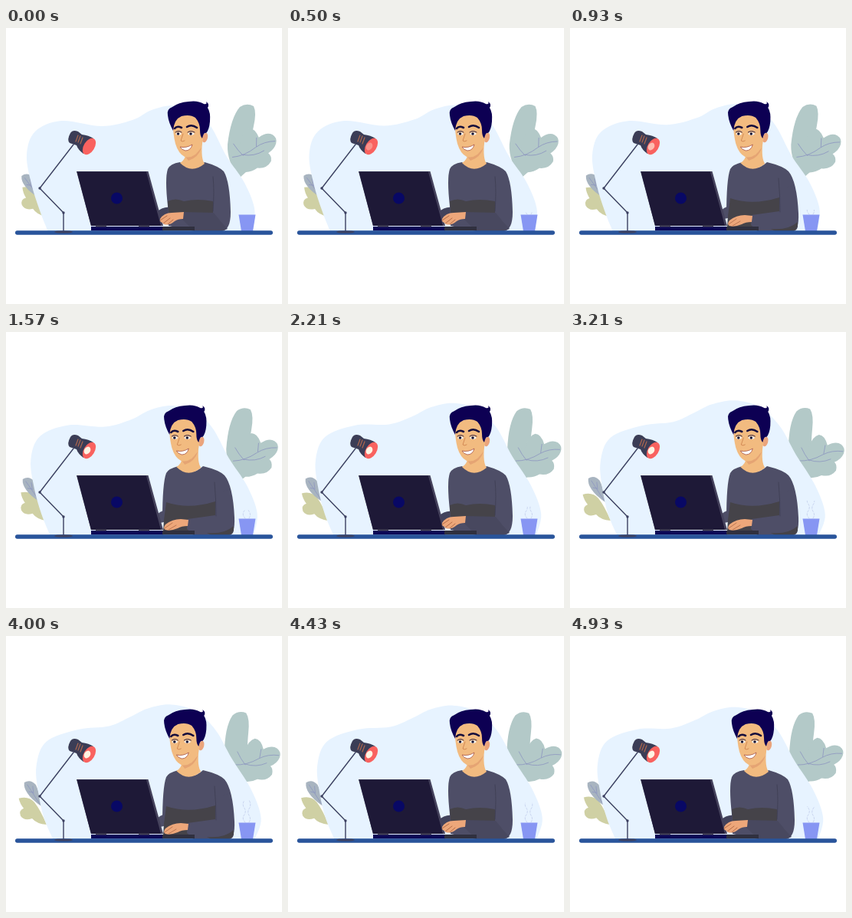
An HTML page that plays this animation: 360 px wide and 360 px high, repeating every 5 s.

```html
<!DOCTYPE html>
<html lang="en">
<head>
<meta charset="utf-8">
<title>Working at a desk</title>
<style>
  html, body { margin: 0; width: 100%; height: 100%; overflow: hidden; background: #fff; }
  svg { display: block; width: 100vw; height: 100vh; }
  .line { fill: none; stroke-linecap: round; stroke-linejoin: round; }
  .navy { fill: #0d0053; }
  .skin { fill: #f2bb80; }
  .hand { fill: #eda77a; }
  .shirt { fill: #4e4e67; }
  .shade { fill: #454349; }
  .crease { stroke: #3b3b50; stroke-width: .7; }
  .vein { stroke: #8d96c0; stroke-width: .8; }
</style>
</head>
<body>
<svg viewBox="0 0 360 360">
  <defs>
    <clipPath id="rise"><rect id="riseBox" x="300" width="30"/></clipPath>
    <g id="head">
      <path class="skin" d="M235 162 Q234 172 227 176 Q242 191 259 177 Q254 170 256 150Z"/>
      <path fill="#e5a473" d="M234 168 Q245 168 255 156 Q251 169 238 173Z"/>
      <ellipse cx="259.5" cy="143" rx="3.5" ry="6.5" fill="#eaa47c" transform="rotate(14 259.5 143)"/>
      <path class="skin" d="M217.5 122 Q218 140 221 151 Q225 164 233 168 Q240 170 247 165 Q255 158 257 146 L258 118 Q236 106 217.5 122Z"/>
      <path class="navy" d="M218 134 Q212 123 211 114 Q209 106 217 103 Q225 97 238 96 Q250 94 258 99 Q263 100 261 96 Q266 99 263 104 Q267 110 266 122 Q265 133 261 137 Q258 135 256 144 Q253 141 253 133 Q253 124 247 117 Q240 112 229 115 Q219 119 218 134Z"/>
      <g class="line" stroke="#140d3c">
        <path stroke-width="2.6" d="M220 131 Q223 127 229 130 M236 129 Q242 125 249 130"/>
        <path stroke-width=".9" d="M221 136 Q225 133 229 136 M237 136 Q241 133 246 136"/>
      </g>
      <path fill="#fff" d="M221 138 Q225 134 229 138 Q225 142 221 138Z M237 138 Q241 134 246 138 Q241 142 237 138Z"/>
      <circle cx="224.5" cy="138" r="1.8" fill="#191532"/>
      <circle cx="241" cy="138" r="1.8" fill="#191532"/>
      <path class="line" stroke="#cf8450" stroke-width=".9" d="M231 138 Q229 144 228 147 Q230 149 233 147"/>
      <path fill="#fff" stroke="#a85240" stroke-width=".8" d="M227 155 Q235 157 243 152 Q241 160 234 160 Q229 159 227 155Z"/>
    </g>
  </defs>

  <path id="yellowLeaf" fill="#cfd0a4" d="M16.500 212 Q29 208 37 217 Q45 227 53 246 Q40 245 34 238 Q24 242 19 235 Q16 228 23 225 Q18 219 16.500 212Z"/>
  <g id="grayLeaf">
    <path fill="#a8b4c0" d="M24 191 Q32 186 39 194 Q44 204 46 222 Q33 213 28 205 Q23 198 24 191Z"/>
    <path class="line vein" d="M28 194 L44 219 M30 203 l5 1 M35 196 l1 9"/>
  </g>
  <path id="tallLeaf" fill="#b3c9c8" d="M304 196 Q288 174 289 152 Q293 117 305 103 Q314 97 323 102 Q327 110 323 128 Q319 146 315 186Z"/>
  <g id="wideLeaf">
    <path fill="#b3c9c8" d="M298 180 Q307 160 312 149 Q317 136 325 134 Q333 135 336 148 Q347 142 354 147 Q360 152 357 159 Q354 166 345 170 Q349 174 347 181 Q340 190 328 187 Q320 191 312 190 L304 194Z"/>
    <path class="line vein" d="M298 168 Q314 169 330 160 Q342 154 356 156 M312 168 Q306 160 302 151 M312 167 Q326 172 340 166 M331 159 l2 -11"/>
  </g>

  <path id="blob" fill="#e7f3ff"/>

  <g id="lean">
    <path fill="#42435c" d="M195 241 Q205 232 215 234 L218 244 Q204 246 197 251Z"/>
    <path class="shirt" d="M227 175 Q214 177 211 184 Q207 196 211 232 L212 258 L246 265 H281 Q293 264 293 240 Q292 200 284 187 Q277 180 259 175 Q243 190 227 175Z"/>
    <path class="shade" d="M211 226 Q221 221 232 226 Q250 222 270 226 L270 241 L212 241Z"/>
    <path fill="#48485f" d="M231 240 L271 241 Q279 252 289 262 L281 265 H246 L229 249Z"/>
    <path class="line crease" d="M270 194 Q272 212 270 239"/>
    <use href="#head"/>
  </g>
  <g id="upright">
    <path class="shirt" d="M194 243 Q198 233 211 232 L216 246 L196 250Z"/>
    <path class="shirt" d="M225 175 Q212 178 209 184 Q204 197 204 245 L245 265 H289 Q299 265 298 242 Q296 200 285 187 Q278 180 257 175 Q241 190 225 175Z"/>
    <path class="shade" d="M209 222 Q238 232 273 221 L275 241 L246 260 H205 L206 245Z"/>
    <path class="shirt" d="M237 244 L273 239 L273 210 L292 205 Q298 225 297 259 Q296 265 289 265 H246 L236 257Z"/>
    <path class="shade" d="M262 262 Q285 264 297 253 Q298 265 289 265 H268Z"/>
    <path class="line crease" d="M272 196 Q274 218 274 240"/>
    <use href="#head" x="-4.7"/>
  </g>

  <path fill="#0b0756" d="M111 259 H205 V264.5 H111Z"/>
  <path fill="#30303f" d="M204 259 H246 V264.5 H204Z"/>
  <path fill="#45425c" d="M92 187 H185.5 L205 258 H111Z"/>
  <path fill="#1e1937" d="M92.500 187.500 H183 L202 258 H111Z"/>
  <path fill="#454458" d="M117 257.5 h14 v2 h-14Z M173 257.5 h14 v2 h-14Z"/>
  <circle cx="144.5" cy="222" r="7.5" fill="#080865"/>

  <g id="leanHand">
    <path class="hand" d="M232 240 L231 249 Q224 249 220 252 Q213 258 206 256 L204 254 Q200 253 201 249 Q206 241 216 241Z"/>
    <path class="line" stroke="#a65e3b" stroke-width=".8" d="M201 251 L210 245 M205 255 L214 248 M211 256 L218 250"/>
  </g>
  <g id="uprightHand">
    <path class="hand" d="M238 245 L237 253 Q229 253 224 256 Q214 260 208 258 Q204 256 208 251 Q217 244 228 244Z"/>
    <path class="line" stroke="#b06a48" stroke-width=".8" d="M207 256 L217 249 M212 258 L222 252"/>
  </g>

  <g class="line" stroke="#3c4161" stroke-width="1.4">
    <path d="M88 152 L44 209 L75 241 V265"/>
    <circle cx="44" cy="209" r="1" fill="#3c4161"/>
    <circle cx="75" cy="241" r="1" fill="#3c4161"/>
  </g>
  <path fill="#3b3d56" d="M84 137 Q87 132 94 135 L99 139 Q108 140 114 144 L101 164 Q94 159 92 153 L83 150 Q79 146 84 137Z"/>
  <path class="line" stroke="#a7654f" stroke-width="1.3" d="M94 140 l-3 8 M97 141 l-3 8 M100 143 l-3 8"/>
  <ellipse cx="108.5" cy="154.5" rx="11.8" ry="7" fill="#f9625f" transform="rotate(-58 108.5 154.5)"/>
  <ellipse id="bulb" cx="106" cy="154.5" rx="5.2" ry="4" fill="#fff3e2" transform="rotate(-58 106 154.5)"/>

  <g clip-path="url(#rise)">
    <path class="line" stroke="#bcc8e8" stroke-width=".7" stroke-dasharray="2.5 2" d="M312 243 q-5 -5 -1 -10 q3 -5 -1 -10 q-2 -4 1 -9 M317 243 q3 -5 0 -9 q-3 -5 1 -10 q2 -5 -1 -10"/>
  </g>
  <path fill="#8796f3" d="M303.500 243.500 H325.500 L322 265 H307Z"/>

  <rect x="12" y="264.3" width="336" height="5.4" rx="2.7" fill="#29549b"/>
  <ellipse cx="75" cy="266" rx="12" ry="1.6" fill="#3c4161"/>
</svg>
<script>
const LOOP = 5000, SWAY = 7140, STEP = 1250;
const $ = id => document.getElementById(id);
const start = [[55,266],[44,238],[33,203],[27,165],[38,135],[72,121],[125,128],[165,120],
  [190,107],[218,101],[246,107],[267,128],[288,168],[310,200],[324,235],[322,266]];
const end = [[62,266],[50,238],[43,207],[40,170],[53,138],[95,122],[135,117],[162,105],
  [185,94],[215,89],[248,98],[274,123],[295,160],[320,200],[333,238],[324,266]];

// Smooth open curve through the points, closed by a straight base.
function curve(p) {
  let d = `M${p[0]}`;
  for (let i = 0; i < p.length - 1; i++) {
    const a = p[i - 1] || p[i], b = p[i], c = p[i + 1], e = p[i + 2] || c;
    const c1 = b.map((v, k) => v + (c[k] - a[k]) / 6);
    const c2 = c.map((v, k) => v - (e[k] - b[k]) / 6);
    d += `C${c1} ${c2} ${c}`;
  }
  return d + 'Z';
}

const turn = (id, deg, x, y) => $(id).setAttribute('transform', `rotate(${deg} ${x} ${y})`);
const show = (id, on) => $(id).setAttribute('visibility', on ? 'visible' : 'hidden');

function draw(t) {
  const s = (1 - Math.cos(2 * Math.PI * t / SWAY)) / 2;
  $('blob').setAttribute('d', curve(start.map((p, i) => p.map((v, k) => v + (end[i][k] - v) * s))));
  turn('tallLeaf', -6.5 * s, 305, 190);
  turn('wideLeaf', -9 * (1 - s), 300, 185);
  turn('grayLeaf', -4 * (1 - s), 50, 245);
  turn('yellowLeaf', 8 * (1 - s), 50, 245);

  const up = Math.floor(t / STEP + .5) % 2 === 1;
  show('upright', up);
  show('uprightHand', up);
  show('lean', !up);
  show('leanHand', !up);

  $('bulb').setAttribute('opacity', Math.min(1, t / 1500));
  const h = 30 * Math.min(1, t / 4000) - Math.max(0, t - 4000) * .0085;
  $('riseBox').setAttribute('y', 244 - h);
  $('riseBox').setAttribute('height', h);
}

const t0 = performance.now();
function tick() {
  draw((performance.now() - t0) % LOOP);
  requestAnimationFrame(tick);
}
draw(0);
requestAnimationFrame(tick);
</script>
</body>
</html>
```
